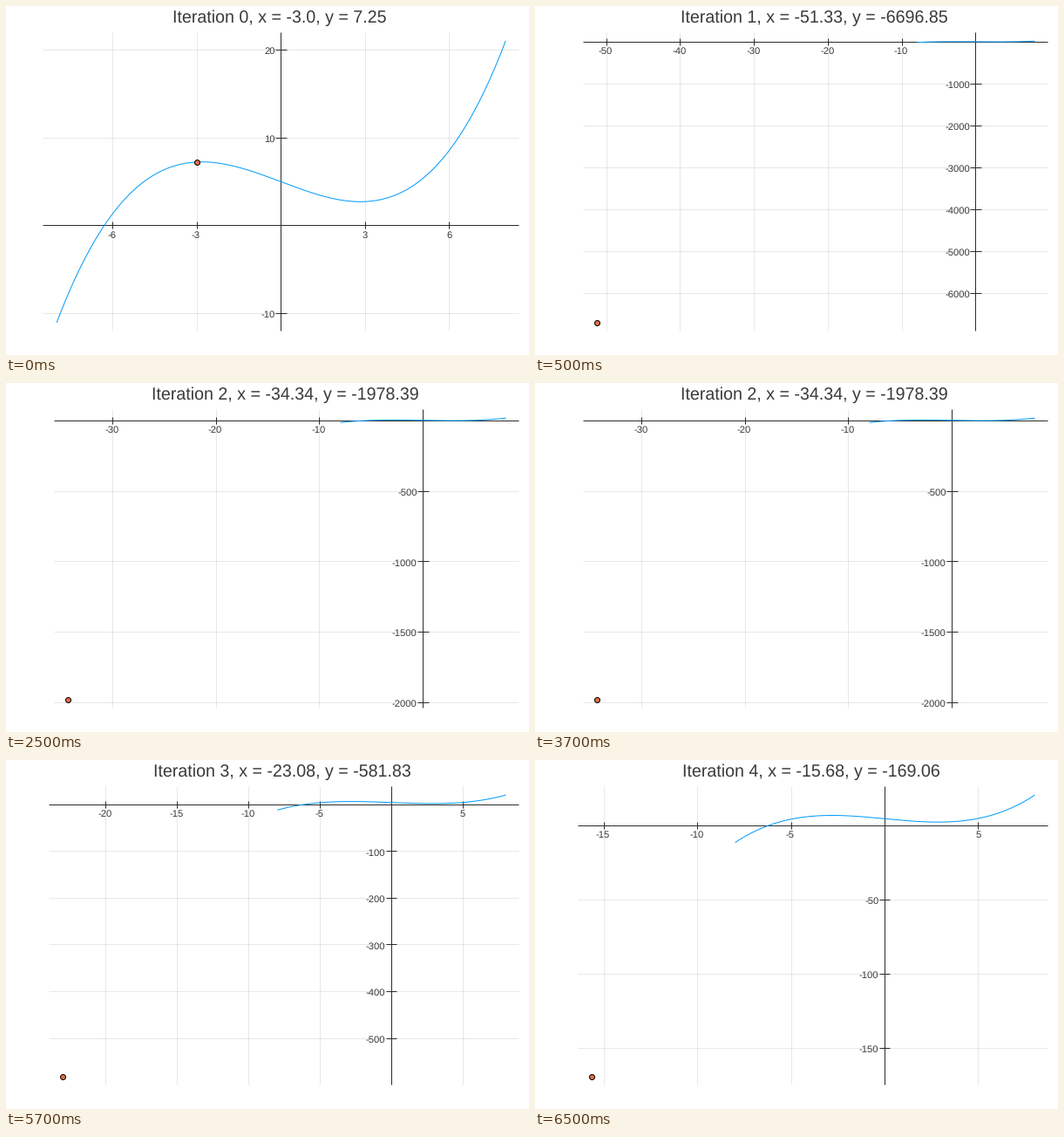
Animation, 600 px wide and 400 px high, one loop 8000 ms. Source, as a matplotlib script:

```python
import numpy as np
import matplotlib.pyplot as plt
from matplotlib.animation import FuncAnimation

plt.rcParams["font.family"] = "Liberation Sans"
plt.rcParams["text.hinting"] = "none"

WIDTH, HEIGHT, DPI = 600, 400, 100
PX = 72 / DPI  # points per pixel
TOP, BOTTOM, RIGHT = 30, 372, 588.1
# Left edge of the plot area, x tick step, y tick step for each iteration
LAYOUT = [(42.2, 3, 10), (55.4, 10, 1000), (55.4, 10, 500),
          (48.8, 5, 100), (48.8, 5, 50)]
INK, TEXT = "#2b2b2b", "#3a3a3a"


def f(x):
    return 0.05 * x**3 - 1.2 * x + 5


def slope(x):
    return 0.15 * x**2 - 1.2


def newton(x, count):
    for _ in range(count):
        x -= f(x) / slope(x)
    return x


def padded(values):
    low, high = min(values), max(values)
    margin = 0.03 * (high - low)
    return low - margin, high + margin


def ticks(limits, step):
    first, last = np.ceil(limits[0] / step), np.floor(limits[1] / step)
    return [int(k * step) for k in np.arange(first, last + 1) if k]


def scale(limits, start, end):
    low, high = limits
    return lambda v: start + (v - low) / (high - low) * (end - start)


fig = plt.figure(figsize=(WIDTH / DPI, HEIGHT / DPI), dpi=DPI, facecolor="white")
ax = fig.add_axes([0, 0, 1, 1])
curve_x = np.linspace(-8, 8, 161)
curve_y = f(curve_x)


def line(xs, ys, color=INK, **style):
    ax.plot(xs, ys, color=color, lw=PX, solid_capstyle="butt", **style)


def label(x, y, text, size=11.2, ha="center"):
    ax.text(x, y, text, size=size * PX, color=TEXT, ha=ha, va="baseline")


def draw(frame):
    iteration = (frame + 3) // 4
    left, x_step, y_step = LAYOUT[iteration]
    x = newton(-3.0, iteration)
    y = f(x)

    x_limits = padded([x, *curve_x])
    y_limits = padded([y, *curve_y])
    to_x = scale(x_limits, left, RIGHT)
    to_y = scale(y_limits, BOTTOM, TOP)
    x0, y0 = to_x(0), to_y(0)
    x_ticks, y_ticks = ticks(x_limits, x_step), ticks(y_limits, y_step)

    ax.clear()
    ax.set(xlim=(0, WIDTH), ylim=(HEIGHT, 0))
    ax.axis("off")

    for value in x_ticks:
        line([to_x(value)] * 2, [TOP, BOTTOM], "black", alpha=0.09)
    for value in y_ticks:
        line([left, RIGHT], [to_y(value)] * 2, "black", alpha=0.09)

    line([left, RIGHT], [y0, y0])
    line([x0, x0], [TOP, BOTTOM])
    for value in x_ticks:
        px = to_x(value)
        line([px, px], [y0 - 4, y0 + 4])
        label(px - (0.7 if value < 0 else 0), y0 + 14, str(value))
    for value in y_ticks:
        py = to_y(value)
        line([x0 - 6, x0 + 6.5], [py, py])
        label(x0 - 6.5, py + 5, str(value), ha="right")

    line(to_x(curve_x) + 0.5, to_y(curve_y) + 0.5, "#009AFA")
    ax.plot(to_x(x) + 0.5, to_y(y) + 0.5, "o", ms=6 * PX, mfc="#E26F46",
            mec="black", mew=PX, snap=False)
    label((left + RIGHT) / 2 - 1.7, 19,
          f"Iteration {iteration}, x = {round(x, 2)}, y = {round(y, 2)}", 19.6)
    return []


animation = FuncAnimation(fig, draw, frames=16, interval=500, init_func=lambda: [],
                          repeat=True, repeat_delay=0, blit=False)
plt.show()
```
